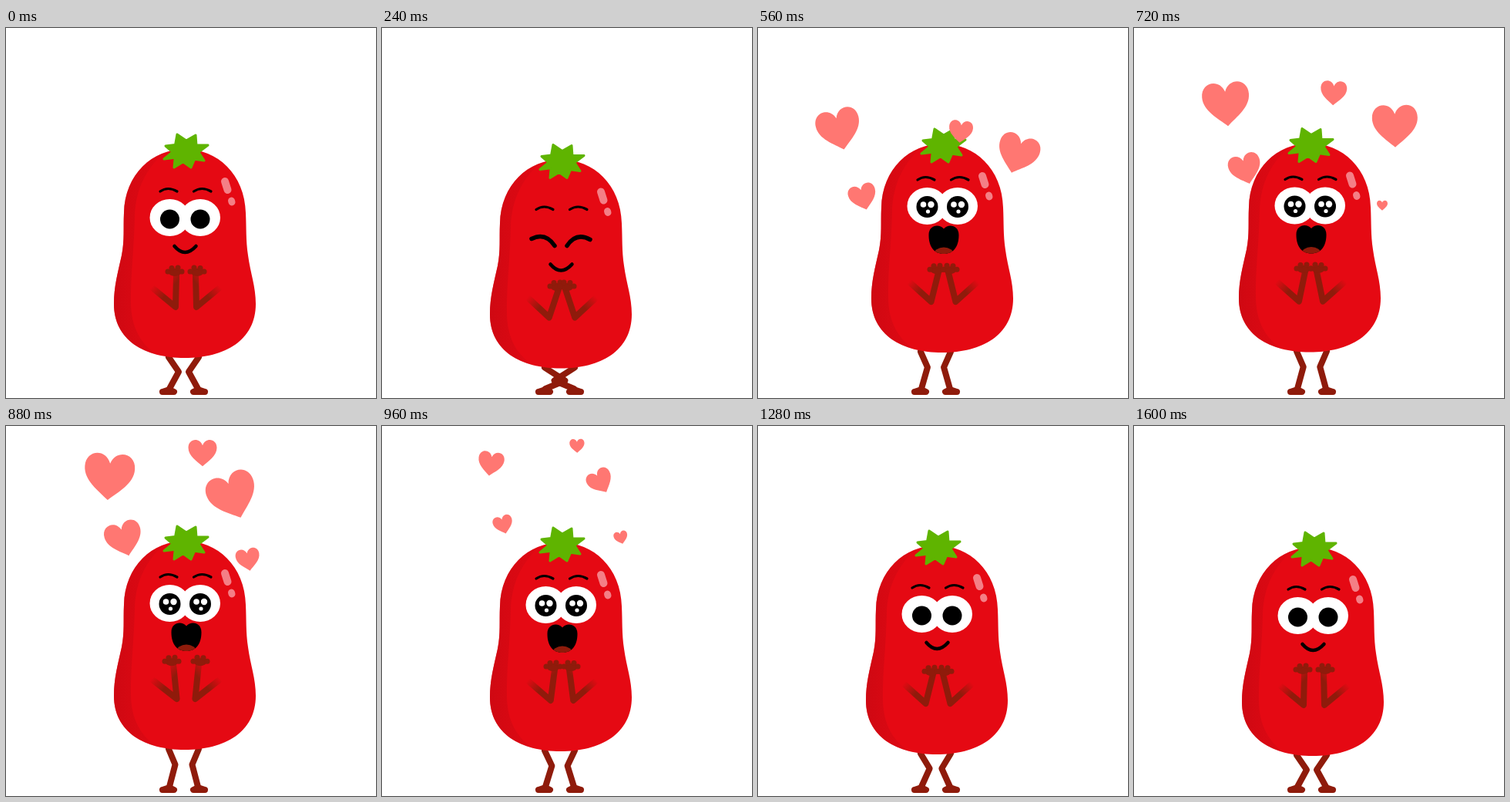
Recreate the animation shown at these times as an HTML page with a canvas. Size 480 by 480 pixels, loop 2 s.

```html
<!DOCTYPE html>
<html lang="en">
<head>
<meta charset="utf-8">
<title>Happy tomato</title>
<style>
html, body { margin: 0; width: 100%; height: 100%; overflow: hidden; background: #fff; }
canvas { display: block; width: 100vmin; height: 100vmin; }
</style>
</head>
<body>
<canvas id="stage" width="480" height="480"></canvas>
<script>
const ctx = document.getElementById('stage').getContext('2d');
const LOOP = 2000, STEP = 80, LAST = 1600;
const RED = '#e50913', BROWN = '#8f1b0b', GREEN = '#5fb400', PINK = '#ff7772';

const bodyPath = new Path2D('M232 157C190 157 154 190 153 240C152 260 154 275 150 295C145 318 140 335 140 358C140 405 180 428 232 428C284 428 324 405 324 358C324 335 317 318 314 295C311 275 312 260 311 240C310 190 274 157 232 157Z');
const shadePath = new Path2D('M222 150C186 172 168 205 167 245C166 290 162 315 162 355C162 390 176 416 210 432L120 440V150Z');
const heartPath = new Path2D('M0 .48C-.2 .3 -.5 .12 -.5 -.17C-.5 -.5 -.1 -.55 0 -.25C.1 -.55 .5 -.5 .5 -.17C.5 .12 .2 .3 0 .48Z');
const gapePath = new Path2D('M0 -14C-6 -21 -19.500 -19 -19.500 -6C-19.500 10 -12 18.500 0 18.500C12 18.500 19.500 10 19.500 -6C19.500 -19 6 -21 0 -14Z');

// Keys are [time, value] pairs.
const bounce = [[0, 0], [80, 3], [160, 10], [240, 13.5], [320, 12], [400, 2], [480, -8], [560, -7], [880, -8], [960, -6], [1040, 1], [1120, 6], [1200, 2], [1280, -2], [1600, 0]];
const sway = [[480, 0], [560, 7], [720, -4], [880, 0]];
const nod = [[0, 0], [160, 7], [240, 10], [320, 9], [400, 1], [480, -8], [960, -8], [1120, 0]];
const clap = [[0, 219], [160, 225], [240, 227], [320, 226], [400, 216], [560, 225], [640, 216], [720, 224], [800, 218], [880, 215], [960, 222], [1040, 217], [1120, 222], [1280, 225], [1600, 219]];
const gape = [[400, 0.3], [480, 0.9], [560, 1], [960, 1], [1040, 0.75], [1120, 0.55], [1200, 0.35]];

const hearts = [
  { from: [105, 131, 57, -14], to: [134, 65, 65, 4], start: 480, drift: 0 },
  { from: [136, 219, 36, -16], to: [153, 146, 48, -16], start: 480, drift: 0 },
  { from: [263, 134, 31, 6], to: [255, 34, 37, 0], start: 480, drift: 0 },
  { from: [337, 163, 54, 18], to: [294, 90, 64, -20], start: 480, drift: 23 },
  { from: [330, 287, 12, 10], to: [314, 173, 31, -10], start: 720, drift: 0 }
];

const mix = (a, b, p) => a + (b - a) * p;

function at(keys, t) {
  if (t <= keys[0][0]) return keys[0][1];
  const i = keys.findIndex(k => k[0] >= t);
  if (i < 0) return keys[keys.length - 1][1];
  const [a, b] = [keys[i - 1], keys[i]];
  return mix(a[1], b[1], (t - a[0]) / (b[0] - a[0]));
}

function moved(x, y, draw) {
  ctx.save();
  ctx.translate(x, y);
  draw();
  ctx.restore();
}

function disc(x, y, rx, color, ry = rx) {
  ctx.fillStyle = color;
  ctx.beginPath();
  ctx.ellipse(x, y, rx, ry, 0, 0, 7);
  ctx.fill();
}

function line(points, width, color) {
  ctx.strokeStyle = color;
  ctx.lineWidth = width;
  ctx.beginPath();
  points.forEach(p => ctx.lineTo(...p));
  ctx.stroke();
}

function arc(x0, y0, cx, cy, x1, y1, width) {
  ctx.strokeStyle = '#000';
  ctx.lineWidth = width;
  ctx.beginPath();
  ctx.moveTo(x0, y0);
  ctx.quadraticCurveTo(cx, cy, x1, y1);
  ctx.stroke();
}

function bothSides(axis, draw) {
  draw();
  ctx.save();
  ctx.translate(2 * axis, 0);
  ctx.scale(-1, 1);
  draw();
  ctx.restore();
}

function drawLegs(dx, dy) {
  const knee = [224 + 0.72 * dy + 0.02 * dy * dy, 446 + 0.85 * dy];
  bothSides(230.5, () => {
    line([[211, 427 + dy], knee, [212, 468]], 8, BROWN);
    line([[203, 472], [212, 469], [218, 472], [203, 472]], 8, BROWN);
  });
}

function drawBody() {
  ctx.fillStyle = RED;
  ctx.fill(bodyPath);
  ctx.save();
  ctx.clip(bodyPath);
  const shade = ctx.createLinearGradient(140, 0, 205, 0);
  shade.addColorStop(0, 'rgba(200,8,18,.75)');
  shade.addColorStop(0.35, 'rgba(200,8,18,.5)');
  shade.addColorStop(1, 'rgba(200,8,18,.15)');
  ctx.fillStyle = shade;
  ctx.fill(shadePath);
  ctx.restore();
  line([[284, 199], [287.5, 210]], 10, '#f47f86');
  line([[292.5, 224], [293, 226]], 9, '#f47f86');
}

function drawLeaf() {
  const tips = [[207, 153], [222, 138], [246, 139], [262, 152], [257, 172], [240, 181], [218, 181], [205, 170]];
  const cx = 233, cy = 160;
  ctx.beginPath();
  tips.forEach(([x, y], i) => {
    const [nx, ny] = tips[(i + 1) % tips.length];
    const angle = Math.atan2((y + ny) / 2 - cy, (x + nx) / 2 - cx);
    ctx.lineTo(x, y);
    ctx.lineTo(cx + 17 * Math.cos(angle), cy + 14 * Math.sin(angle));
  });
  ctx.closePath();
  ctx.fillStyle = ctx.strokeStyle = GREEN;
  ctx.lineWidth = 3;
  ctx.fill();
  ctx.stroke();
}

function drawEyes(closed, amazed) {
  if (closed) {
    arc(194, 250, 212, 241, 224, 259, 5.5);
    arc(240, 259, 252, 241, 270, 251, 5.5);
    return;
  }
  const eyes = [212.5, 252];
  eyes.forEach(x => disc(x, 246, 26, '#fff', 24));
  eyes.forEach(x => {
    if (!amazed) return disc(x, 248, 12.5, '#000');
    disc(x, 247, 14, '#000');
    disc(x - 5, 244, 3.8, '#fff');
    disc(x + 5, 244, 4.2, '#fff');
    disc(x + 1, 253, 2.6, '#fff');
  });
}

function drawMouth(open) {
  if (!open) return arc(218.5, 283, 232, 299, 246.5, 283, 4.5);
  moved(234, 289.5, () => {
    ctx.scale(1, open);
    ctx.fillStyle = '#000';
    ctx.fill(gapePath);
    ctx.clip(gapePath);
    disc(0, 19, 13, BROWN, 9);
  });
}

function drawFace(t) {
  const amazed = t >= 440 && t < 1040;
  const closed = (t >= 160 && t < 440) || (t >= 1040 && t < 1240);
  arc(200, 212, 210, 205, 222, 212, 3.2);
  arc(243.5, 212, 254, 205, 266, 212, 3.2);
  drawEyes(closed, amazed);
  drawMouth(t >= 440 && t < 1240 ? at(gape, t) : 0);
}

function drawArms(handX) {
  const reach = handX - 219;
  const handY = 316 + 0.7 * reach;
  const fade = ctx.createLinearGradient(189, 336, 220, 363);
  fade.addColorStop(0, 'rgba(143,27,11,0)');
  fade.addColorStop(0.5, BROWN);
  bothSides(233.5, () => {
    line([[191, 338], [220 - 0.4 * reach, 362], [handX + 2, handY + 4]], 8, fade);
    disc(handX, handY + 1, 8, BROWN, 5);
    [[-9, 0], [-4, -4.5], [4, -5], [9, 0]].forEach(([x, y]) =>
      disc(handX + x, handY + y, 3.5, BROWN));
  });
}

function drawHeart(heart, t) {
  if (t < heart.start || t >= 1040) return;
  const p = (t - 560) / 320;
  const [x, y, size, tilt] = heart.from.map((v, i) => mix(v, heart.to[i], p));
  const drift = heart.drift * Math.sin(Math.PI * Math.min(1, Math.max(0, p)));
  const pop = t === heart.start ? 0.65 : t > 880 ? 0.5 : 1;
  moved(x + drift, Math.max(y, size * pop / 2 + 16), () => {
    ctx.rotate(tilt * Math.PI / 180);
    ctx.scale(size * pop, size * pop);
    ctx.fillStyle = PINK;
    ctx.fill(heartPath);
  });
}

function draw(now) {
  const t = Math.min(LAST, Math.floor((now % LOOP) / STEP) * STEP);
  const dx = at(sway, t), dy = at(bounce, t);
  ctx.fillStyle = '#fff';
  ctx.fillRect(0, 0, 480, 480);
  ctx.lineCap = ctx.lineJoin = 'round';
  drawLegs(dx, dy);
  moved(dx, dy, () => {
    drawBody();
    drawLeaf();
    moved(0, at(nod, t), () => drawFace(t));
    drawArms(at(clap, t));
  });
  hearts.forEach(heart => drawHeart(heart, t));
}

const begun = performance.now();
function tick() {
  draw(performance.now() - begun);
  requestAnimationFrame(tick);
}
tick();
</script>
</body>
</html>
```
